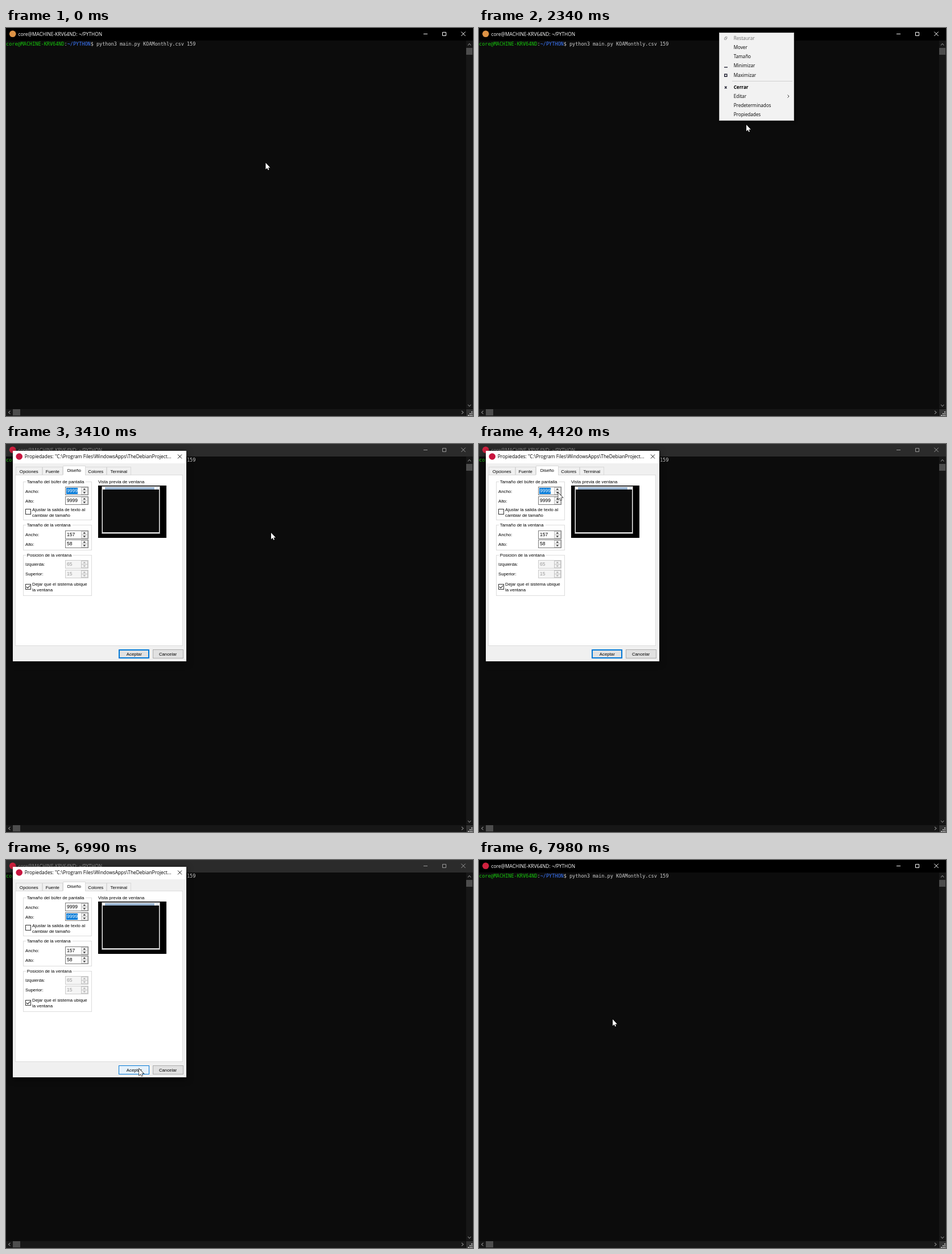
Recreate the animation shown at these times as an HTML page. Size 821 by 682 pixels, loop 8000 ms.

```html
<!DOCTYPE html>
<html lang="es">
<head>
<meta charset="utf-8">
<title>Terminal</title>
<style>
html, body { margin: 0; width: 100%; height: 100%; overflow: hidden; background: #0c0c0c; }
svg { display: block; width: 821px; height: 682px; cursor: default; }
rect { shape-rendering: crispEdges; }
text { white-space: pre; }
.ui { font: 8.13px "Open Sans", "Noto Sans", sans-serif; }
.cap { font: 8.4px "Open Sans", "Noto Sans", sans-serif; }
.dlg { font: 7.8px "Liberation Sans", sans-serif; }
.num { font: 8.5px "Liberation Sans", sans-serif; }
.mono { font: 8.52px "DejaVu Sans Mono", monospace; }
.bold { font-weight: 700; }
#dialog { transform-origin: 164px 197px; filter: drop-shadow(0 3px 6px rgba(0,0,0,.65)); }
#menu { filter: drop-shadow(2px 2px 2px rgba(0,0,0,.5)); }
#arrow { paint-order: stroke; }
</style>
</head>
<body>
<svg id="stage" viewBox="0 0 821 682" xmlns="http://www.w3.org/2000/svg"></svg>
<script>
const LOOP = 8000;
const stage = document.getElementById('stage');

// Markup helpers
const fillBox = (x, y, w, h, fill, extra = '') =>
  `<rect x="${x}" y="${y}" width="${w}" height="${h}" fill="${fill}" ${extra}/>`;
const box = (x, y, w, h, fill, stroke, extra = '') =>
  `<rect x="${x + .5}" y="${y + .5}" width="${w - 1}" height="${h - 1}" fill="${fill}" stroke="${stroke}" ${extra}/>`;
const label = (x, y, str, cls, fill = '#000', extra = '') =>
  `<text x="${x}" y="${y}" class="${cls}" fill="${fill}" ${extra}>${str}</text>`;
const line = (d, stroke, width = 1, extra = '') =>
  `<path d="${d}" fill="none" stroke="${stroke}" stroke-width="${width}" ${extra}/>`;
const group = (id, body, extra = '') => `<g id="${id}" ${extra}>${body}</g>`;

function terminal() {
  const grey = '#868686';
  return fillBox(0, 0, 821, 682, '#0c0c0c')
    + fillBox(0, 0, 821, 22, '#000', 'id="bar"')
    + '<circle id="icon" cx="11.7" cy="10.3" r="5.8"/>'
    + group('caption',
        label(21.5, 13.6, 'core@MACHINE-KRV64ND: ~/PYTHON', 'cap', 'currentColor')
        + line('M734 10.5h7', 'currentColor')
        + line('M767.5 7.5h6v6h-6z', 'currentColor')
        + line('M800.3 6.6l7.4 7.4m0-7.4l-7.4 7.4', 'currentColor'))
    + '<text x="0" y="31" class="mono" fill="#ccc"><tspan fill="#16c60c">core@MACHINE-KRV64ND</tspan>:'
    + '<tspan fill="#3b78ff">~/PYTHON</tspan>$ python3 main.py KOAMonthly.csv 159</text>'
    + fillBox(333, 31, 5, 2, '#ccc', 'id="caret"')
    + fillBox(809, 22, 12, 647, '#171717') + fillBox(809, 35, 11, 12, '#4d4d4d')
    + fillBox(0, 670, 808, 12, '#171717') + fillBox(12, 670, 13, 11, '#4d4d4d')
    + line('M812 30.5l2.7-3 2.7 3M812 662l2.7 3 2.7-3M7.5 673l-3 2.7 3 2.7M801 673l3 2.7-3 2.7', grey, 1.1)
    + fillBox(809, 670, 12, 12, '#333') + grip();
}

function grip() {
  let out = '';
  for (let r = 0; r < 3; r++)
    for (let c = 2 - r; c < 3; c++) out += fillBox(812 + c * 3, 674 + r * 3, 2, 2, '#bbb');
  return out;
}

const items = [
  ['Restaurar', 18], ['Mover', 34], ['Tamaño', 50], ['Minimizar', 66.4], ['Maximizar', 82.5],
  ['Cerrar', 104], ['Editar', 120], ['Predeterminados', 136], ['Propiedades', 152.3]
];

function menu() {
  const ink = '#223';
  const rows = items.map(([name, y]) => label(447.7, y + 3, name,
    name === 'Cerrar' ? 'ui bold' : 'ui', name === 'Restaurar' ? '#6d6d6d' : '#000')).join('');
  return group('menu', box(422, 8, 132, 155, '#f2f2f2', '#bdbdbd')
    + fillBox(424, 0, 128, 16, '#91c9f7', 'id="hover"') + rows
    + line('M445 93.5h106', '#d0d0d0')
    + line('M431.5 17.5h3v3h-3zM433 17v-1.5h3v3h-1.5', '#999', .9)
    + line('M431 69h6', ink, 1.4) + line('M431.7 81.2h4.2v4h-4.2z', ink, 1.4)
    + line('M432 102.5l3.5 4m0-4l-3.5 4', ink, 1.2)
    + line('M542.5 117.5l2.5 2.5-2.5 2.5', '#222', .9));
}

function field(y, value, name, off) {
  const ink = off ? '#999' : '#000';
  const spin = off ? '#aaa' : '#222';
  const edge = off ? '#ccc' : '#7a7a7a';
  return box(104, y, 41, 15, off ? '#f5f5f5' : '#fff', edge)
    + fillBox(106, y + 2, 20, 11, '#0078d7', `id="${name}Sel" visibility="hidden"`)
    + label(107, y + 10.2, value, 'num', ink, `id="${name}"`)
    + box(132, y + 1, 12, 7, '#f0f0f0', '#c4c4c4') + box(132, y + 7, 12, 7, '#f0f0f0', '#c4c4c4')
    + `<path d="M135.5 ${y + 5.6}l2.3-2.6 2.3 2.6zM135.5 ${y + 9.4}l2.3 2.6 2.3-2.6z" fill="${spin}"/>`;
}

function frame(y, h, title, width) {
  return box(30, y, 121, h, 'none', '#dcdcdc') + fillBox(35, y - 4, width, 9, '#fff')
    + label(36.8, y + 2.8, title, 'dlg');
}

function tab(x, w, name, on) {
  return (on ? fillBox(x, 39, w, 17, '#fff') + line(`M${x + .5} 54V38.5h${w}V54`, '#d9d9d9')
             : box(x, 40, w + 1, 15, '#f0f0f0', '#d9d9d9'))
    + label(x + w / 2 + .3, on ? 49.3 : 50.5, name, 'dlg', '#000', 'text-anchor="middle"');
}

function preview() {
  return fillBox(162, 73, 120, 92, '#000') + fillBox(168, 74, 103, 84, '#777')
    + box(169, 75, 101, 82, '#c8c8c8', '#eee') + fillBox(171, 76, 98, 4, '#99b4d1')
    + fillBox(170, 76, 4, 4, '#fff') + fillBox(261, 76, 4, 4, '#fff') + fillBox(266, 76, 4, 4, '#fff')
    + fillBox(170, 80, 99, 75, '#0c0c0c');
}

function dialog() {
  const body = fillBox(12, 12, 305, 370, '#f0f0f0') + fillBox(12, 12, 305, 22, '#fff')
    + '<circle cx="23.2" cy="22" r="5.8" fill="#c8153f"/>'
    + label(32.7, 25.2, 'Propiedades: "C:\\Program Files\\WindowsApps\\TheDebianProject...', 'cap')
    + line('M302 18.5l7 7m0-7l-7 7', '#111')
    + box(16, 54, 295, 301, '#fff', '#dcdcdc')
    + tab(17, 46, 'Opciones') + tab(64, 35, 'Fuente') + tab(139, 37, 'Colores')
    + tab(177, 42, 'Terminal') + tab(100, 39, 'Diseño', true)
    + frame(66, 68, 'Tamaño del búfer de pantalla', 105)
    + frame(142, 45, 'Tamaño de la ventana', 82)
    + frame(195, 72, 'Posición de la ventana', 83)
    + label(34, 86, 'Ancho:', 'dlg') + field(75, '9999', 'wide')
    + label(34, 102.6, 'Alto:', 'dlg') + field(92, '9999', 'tall')
    + fillBox(124, 94, 1, 10, '#ff8728', 'id="editCaret"')
    + box(34, 114, 10, 10, '#fff', '#333')
    + label(46, 118, 'Ajustar la salida de texto al', 'dlg') + label(46, 127.6, 'cambiar de tamaño', 'dlg')
    + label(34, 162, 'Ancho:', 'dlg') + field(152, '157', 'cols')
    + label(34, 178.6, 'Alto:', 'dlg') + field(168, '58', 'rows')
    + label(34, 214, 'Izquierda:', 'dlg') + field(204, '65', 'left', true)
    + label(34, 231, 'Superior:', 'dlg') + field(221, '15', 'top', true)
    + box(34, 246, 10, 10, '#fff', '#333') + line('M36 251l2.2 2.3 4.2-4.7', '#222', 1.1)
    + label(46, 249.4, 'Dejar que el sistema ubique', 'dlg') + label(46, 259, 'la ventana', 'dlg')
    + label(162, 68.8, 'Vista previa de ventana', 'dlg') + preview()
    + fillBox(199, 361, 53, 15, '#e1e1e1', 'id="accept" stroke="#0078d7"')
    + label(225.3, 371.6, 'Aceptar', 'dlg', '#000', 'text-anchor="middle"')
    + box(258, 361, 54, 16, '#e1e1e1', '#adadad')
    + label(284.5, 371.6, 'Cancelar', 'dlg', '#000', 'text-anchor="middle"');
  return group('dialog', body);
}

stage.innerHTML = terminal() + menu() + dialog()
  + '<circle id="ring" fill="#e6e600"/>'
  + group('pointer',
      '<path id="arrow" d="M0 0V11.5L2.7 9.1L4.3 12.8L6 12.1L4.3 8.4H8Z" fill="#fff" stroke="#000" stroke-width="1.2"/>'
      + line('M-2-6h1.4L0-5.5L.6-6H2M0-5.5V5.5M-2 6h1.4L0 5.5L.6 6H2', '#000', .9, 'id="beam"'));

const el = {};
stage.querySelectorAll('[id]').forEach(n => { el[n.id] = n; });
const set = (name, attrs) => { for (const k in attrs) el[name].setAttribute(k, attrs[k]); };
const show = (name, on) => set(name, { visibility: on ? 'visible' : 'hidden' });

// Pointer stops: time, x, y
const stops = [
  [0, 456.5, 237], [120, 456.5, 237], [850, 428, 17], [930, 428, 16.5], [1140, 426, 14], [1320, 425, 13],
  [1560, 425, 13], [2200, 470, 170], [2360, 470, 170], [2540, 469, 152], [2750, 469, 152],
  [3080, 467, 156], [3420, 466, 156], [3920, 224, 108], [4710, 122, 81], [4780, 122, 81],
  [4860, 120, 81], [5090, 120, 81], [5380, 119, 98], [5680, 119, 98], [5880, 159, 154],
  [6630, 234, 367], [7340, 234, 367], [7980, 235, 280], [8000, 235, 280]
];
const clicks = [1480, 2560, 5515, 7335];

const slope = (i, k) => (stops[i + 1][k] - stops[i][k]) / (stops[i + 1][0] - stops[i][0]);

// Monotone tangent: zero at rests and turning points
function tangent(i, k) {
  if (i === 0 || i === stops.length - 1) return 0;
  const a = slope(i - 1, k), b = slope(i, k);
  return a * b > 0 ? 2 * a * b / (a + b) : 0;
}

function pointerAt(t) {
  let i = 0;
  while (i < stops.length - 2 && t >= stops[i + 1][0]) i++;
  const span = stops[i + 1][0] - stops[i][0];
  const u = (t - stops[i][0]) / span, v = 1 - u;
  return [1, 2].map(k =>
    v * v * (1 + 2 * u) * stops[i][k] + u * u * (3 - 2 * u) * stops[i + 1][k]
    + span * u * v * (v * tangent(i, k) - u * tangent(i + 1, k)));
}

const ramp = (t, a, b) => Math.min(1, Math.max(0, (t - a) / (b - a)));
const within = (x, y, l, t, r, b) => x >= l && x <= r && y >= t && y <= b;

function update(t) {
  const [x, y] = pointerAt(t);
  const opened = ramp(t, 2930, 3120) * (1 - ramp(t, 7420, 7570));
  const inactive = t >= 2900 && t < 7440;

  set('bar', { fill: inactive ? '#2b2b2b' : '#000' });
  set('caption', { color: inactive ? '#999' : '#fff' });
  set('icon', { fill: t < 2900 ? '#dc9245' : '#d0213f' });
  show('caret', t < 2650 && Math.floor(t / 530) % 2 === 1);

  const menuIn = t < 2640 ? ramp(t, 1560, 1680) : 0;
  set('menu', { opacity: menuIn });
  show('menu', menuIn > 0);
  const row = items.find(item => Math.abs(y - item[1]) <= 8);
  const hovering = menuIn > 0 && row && within(x, y, 424, 10, 552, 160.5);
  show('hover', hovering);
  if (hovering) set('hover', { y: row[1] - 8 });

  show('dialog', opened > 0);
  set('dialog', { opacity: opened });
  el.dialog.style.transform = `scale(${.95 + .05 * (1 - (1 - opened) ** 2)})`;
  const wideOn = t < 5400, tallOn = t >= 5530;
  show('wideSel', opened > 0 && wideOn);
  show('tallSel', opened > 0 && tallOn);
  set('wide', { fill: wideOn ? '#fff' : '#000' });
  set('tall', { fill: tallOn ? '#fff' : '#000' });
  show('editCaret', opened > 0 && t > 5930 && t < 6990 && Math.floor((6990 - t) / 530) % 2 === 0);

  const over = opened > .5 && within(x, y, 199, 361, 252, 376);
  const edge = over ? 1 : 2, inset = edge / 2;
  set('accept', {
    x: 198 + inset, y: 361 + inset - .5, width: 54 - edge, height: 16 - edge,
    fill: over ? '#e5f1fb' : '#e1e1e1', 'stroke-width': edge
  });

  const click = clicks.find(c => t >= c && t < c + 350);
  show('ring', click !== undefined);
  if (click !== undefined) {
    const p = (t - click) / 350, [cx, cy] = pointerAt(click);
    set('ring', { cx, cy, r: 4 + 9 * p, opacity: 1 - p });
  }

  const editing = opened > .5 && within(x, y, 104, 75, 131, 106);
  show('arrow', !editing);
  show('beam', editing);
  set('pointer', { transform: `translate(${x.toFixed(2)} ${y.toFixed(2)})` });
}

function tick() {
  update(performance.now() % LOOP);
  requestAnimationFrame(tick);
}
tick();
</script>
</body>
</html>
```
